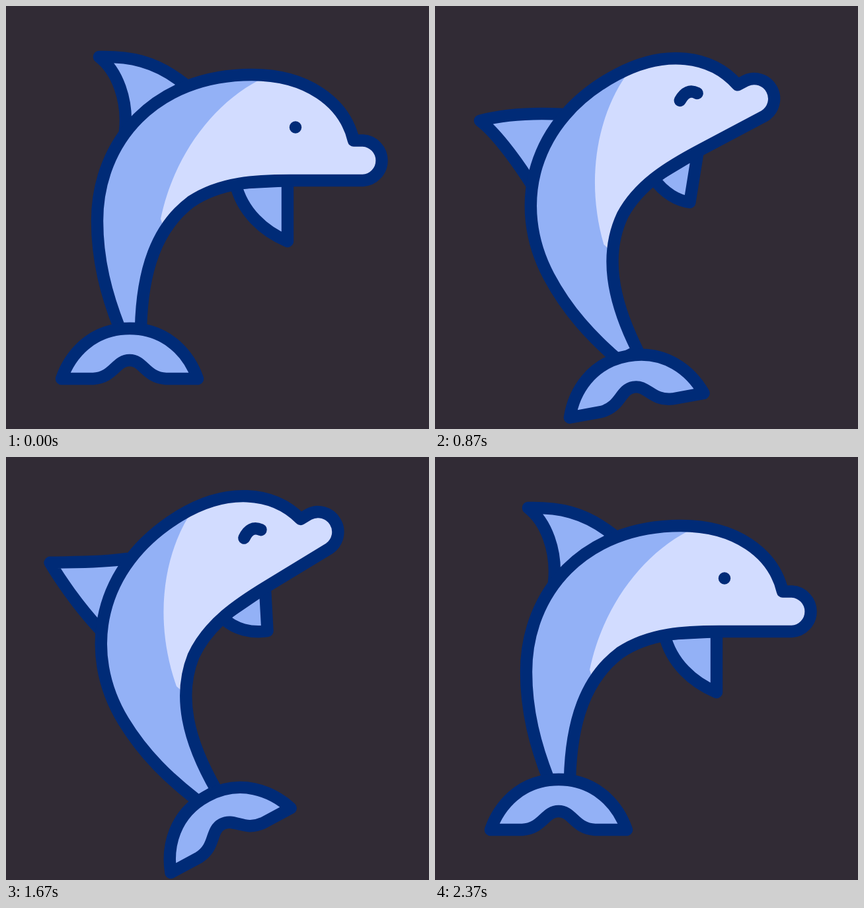
Write an HTML page that moves like this. It is 640 by 640 pixels and loops after 2670 ms.

```html
<!DOCTYPE html>
<html lang="en">
<head>
<meta charset="utf-8">
<title>Dolphin</title>
<style>
  html, body { margin: 0; width: 100%; height: 100%; overflow: hidden; background: #312b35; }
  svg { display: block; width: 100vw; height: 100vh; }
  .line { stroke: #002b77; stroke-width: 18.4; stroke-linejoin: round; stroke-linecap: round; }
  .mid { fill: #93b1f6; }
  .light { fill: #d2dcff; }
  .none { fill: none; }
</style>
</head>
<body>
<svg viewBox="0 0 640 640">
  <defs>
    <path id="shape" d="M526 203.5 C512 145 455 104 372 104 C225 104 138 205 138 325
      C138 385 152 437 172 488 L204 488 C206 400 228 335 280 296
      C325 266 380 264 430 264 L540 264 A30.3 30.3 0 0 0 540 203.5 Z"/>
    <clipPath id="inside"><use href="#shape"/></clipPath>
  </defs>
  <g id="dolphin">
    <path id="dorsal" class="line mid"/>
    <path id="flipper" class="line mid"/>
    <use href="#shape" class="mid"/>
    <path class="light" clip-path="url(#inside)" d="M400 104 L383 112
      C310 150 253 230 234 322 L240 340 H620 V90 Z"/>
    <use href="#shape" class="line none"/>
    <path id="eye" class="line none"/>
    <path id="fluke" class="line mid" d="M84 564 C97 527 130 488 187 488
      C244 488 277 527 290 564 L242 564 C211 562 208 536 187 536
      C166 536 163 562 132 564 Z"/>
  </g>
</svg>
<script>
const FRAMES = 80, STEP = 2670 / FRAMES;
const $ = id => document.getElementById(id);

// Pose: body angle, shift x, shift y, fluke angle, dorsal bend, flipper tip x, y, eye squint
const rest = [0, 0, 0, 0, 0, 426, 356, 0];
const dip = [10, 18.3, 5, 0, 0, 426, 356, 0];
const rise = [-16, 7, -22, -15, 0.4, 432, 336, 0.45];
const leap = [-36, 9.3, -46, -20, 1, 437.5, 313, 1];
const high = [-36, 9.3, -43, -20, 1, 437.5, 313, 1];
const low = [-27, 10.5, 4, 22, 0.3, 372, 328, 1];
const between = [-31.3, 10.4, -19.5, 3, 0.65, 395, 322, 1];
const settle = [-18, 6, -21.5, -10, 0.39, 432, 336, 0.15];
const calm = [-10, 3, -12, -6.5, 0.2, 430, 344, 0.03];
const keys = [
  [0, rest], [10, dip], [16, rise], [20, leap],
  [27.5, low], [32, between], [36.5, high],
  [45.5, low], [50, between], [54.5, high],
  [62, settle], [64, calm], [71, rest], [FRAMES, rest]
];

const slope = (i, c) => (keys[i + 1][1][c] - keys[i][1][c]) / (keys[i + 1][0] - keys[i][0]);

// Zero at turning points, harmonic mean elsewhere
function tangent(i, c) {
  if (i === 0 || i === keys.length - 1) return 0;
  const a = slope(i - 1, c), b = slope(i, c);
  return a * b > 0 ? 2 * a * b / (a + b) : 0;
}

function poseAt(frame) {
  let i = 0;
  while (i < keys.length - 2 && frame >= keys[i + 1][0]) i++;
  const [t0, p] = keys[i], [t1, q] = keys[i + 1];
  const h = t1 - t0, u = (frame - t0) / h, v = 1 - u;
  return p.map((a, c) =>
    a * v * v * (1 + 2 * u) + q[c] * u * u * (3 - 2 * u) +
    h * u * v * (v * tangent(i, c) - u * tangent(i + 1, c)));
}

// Control, control, tip, control, control
const finRest = [185, 142, 168, 98, 141, 77, 185, 76, 225, 82];
const finBent = [161, 138, 167, 83, 182, 55, 198, 78, 236, 113];

function dorsalPath(s) {
  const p = finRest.map((a, i) => a + (finBent[i] - a) * s);
  return `M180 190 C${p.slice(0, 6)} C${p.slice(6)} 270 118 L230 180 Z`;
}

function flipperPath(x, y) {
  const bx = 347, by = 268, dx = x - bx, dy = y - by;
  return `M${bx} ${by} C${bx + 0.13 * dx} ${by + 0.5 * dy} ` +
    `${bx + 0.55 * dx} ${by + 0.83 * dy} ${x} ${y} L426 264 Z`;
}

function draw(frame) {
  const [turn, x, y, tail, bend, fx, fy, k] = poseAt(frame);
  $('dolphin').setAttribute('transform', `translate(${x} ${y}) rotate(${turn} 320 320)`);
  $('fluke').setAttribute('transform', `rotate(${tail} 187 488)`);
  $('dorsal').setAttribute('d', dorsalPath(bend));
  $('flipper').setAttribute('d', flipperPath(fx, fy));
  $('eye').setAttribute('d',
    `M438 183.5 Q${438 + 18 * k} ${183.5 - 12 * k} ${438.01 + 28 * k} ${183.5 + 2.5 * k}`);
}

function tick() {
  draw(Math.floor((performance.now() + 4) / STEP) % FRAMES);
  requestAnimationFrame(tick);
}
tick();
</script>
</body>
</html>
```
